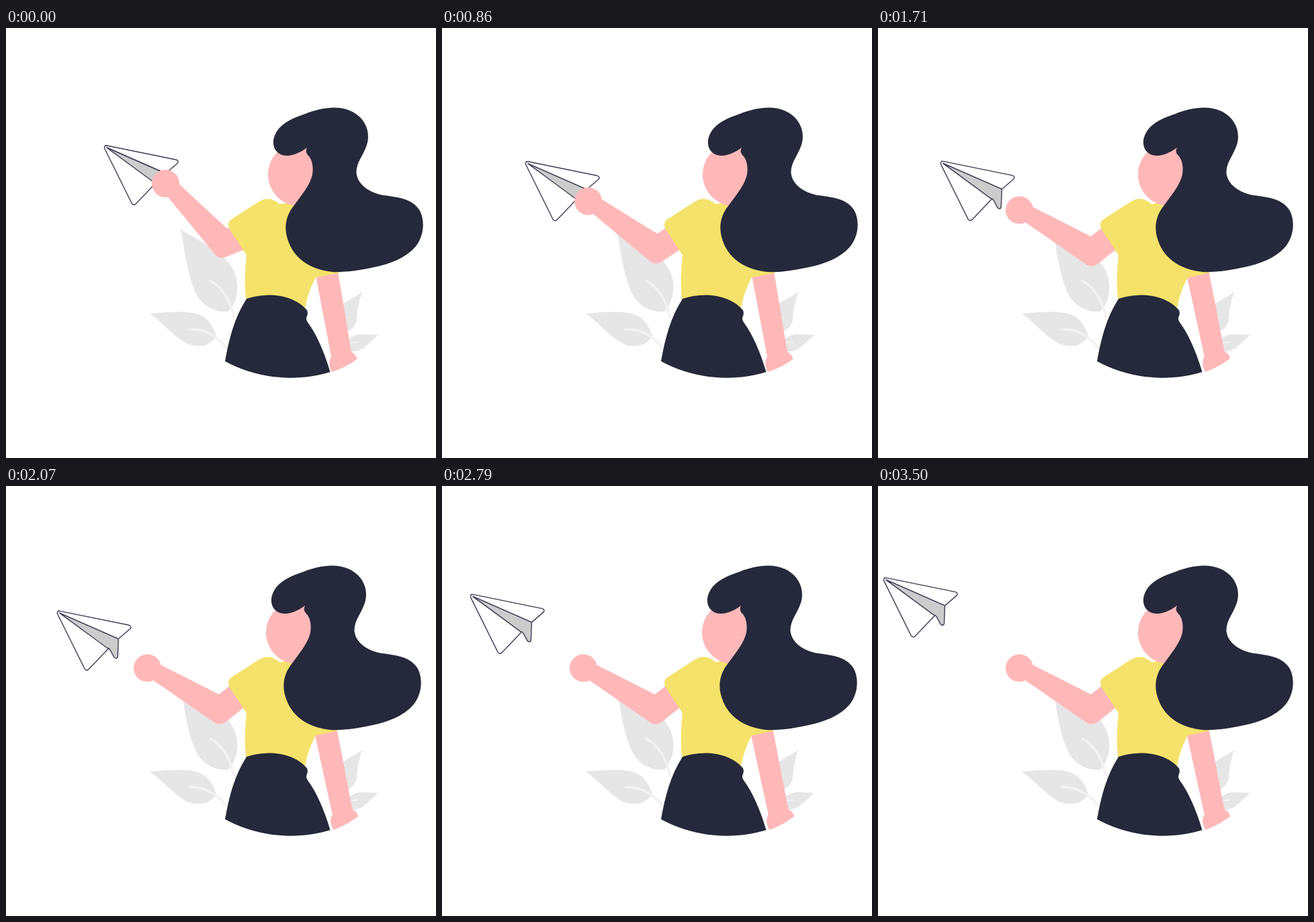
An HTML page that plays this animation: 640 px wide and 640 px high, repeating every 3.57 s.

```html
<!DOCTYPE html>
<html lang="en">
<head>
<meta charset="utf-8">
<title>Paper plane</title>
<style>
  html, body { margin: 0; width: 100%; height: 100%; overflow: hidden; background: #fff; }
  svg { display: block; width: 100%; height: 100%; }
  .leaf { fill: #e6e6e6; }
  .vein { fill: none; stroke: #f2f2f2; stroke-width: 3.5; stroke-linecap: round; }
  .skin { fill: #ffb8b8; }
  .shirt { fill: #f5e26b; }
  .dark { fill: #26293b; }
  #plane { fill: #fff; stroke: #3f3d56; stroke-width: 1.4; stroke-linejoin: round; }
</style>
</head>
<body>
<svg viewBox="0 0 640 640">
  <path class="leaf" d="M260 300C266 330 270 372 285 399C295 416 314 424 331 422C341 411 346 396 344 379C340 340 296 322 260 300Z"/>
  <path class="leaf" d="M214 425C250 422 283 419 298 433Q307 441 313 458C303 475 285 476 270 470C250 460 235 440 214 425Z"/>
  <path class="leaf" d="M530 393C514 405 494 408 490 430L500 453C512 453 521 444 522 434C523 418 526 405 530 393Z"/>
  <path class="leaf" d="M554 457C536 456 520 453 511 463L511 481C530 485 540 468 554 457Z"/>
  <path class="vein" d="M304 376C320 385 333 402 339 430M273 448.5C295 447 314 458 330 478"/>
  <path class="vein" style="stroke-width:2" d="M500 436L508 431M508 470Q516 467 523 468"/>

  <g id="plane">
    <path d="M149.5 177.5L187 261Q190 265 193.500 261.500L223 230.500Z" stroke="none"/>
    <path d="M150 178Q145.500 174 150 175L253 196Q257.500 197.500 255.500 201L237.500 216.500Z"/>
    <path d="M150 175Q145.500 175 146.800 179.500L187.200 261Q190 265 193.500 261.500L223 230.500L150 178"/>
    <path fill="#ccc" d="M150 178L237.500 216.500L236.500 242.500C236 247 232 246 230.500 243L225.500 233.500Q223.500 230 220.500 230Z"/>
  </g>

  <g id="throwArm" class="skin">
    <circle cx="237.5" cy="231.5" r="20.5"/>
    <path d="M252 227L329 298.500L352 289L363 326L327 341Q317 344 311 337L239 249Z"/>
  </g>

  <g id="restArm">
    <path class="skin" d="M461 368L494 362L514 482Q521 486 522.500 493Q504 506 485 512Q478 500 484 489Z"/>
    <path class="shirt" d="M450 340H489L495 365L462 371Z"/>
  </g>

  <path class="shirt" d="M333 300Q328 291 335 285L377 258Q392 249 407 262L428 259L480 320L476 362L461 371Q450 391 445 417L440 428L358 408C354 385 356 358 358 338Z"/>
  <path class="dark" d="M358 403C386 393 427 395 448 420Q450 425 447.500 430Q446 434 449 438C463 457 474 483 482.500 512C434 527 375 523 326 496C332 462 340 431 358 403Z"/>

  <g id="head">
    <circle class="skin" cx="437" cy="218" r="47"/>
    <path class="dark" d="M448 178C440 184 425 193 411 189C399 185 395 172 400 160C407 143 424 135 445 128C470 118 498 114 518 126C535 136 543 155 537 174C532 190 521 200 521.500 216C524 234 541 245 562 249C585 252 605 254 616 272C624 288 622 310 609 326C595 342 572 351 548 356C525 361 505 364 486 363C455 360 432 345 422 322C412 300 416 280 428 265C437 252 452 236 456 218C458 205 455 195 450 190C446 186 446 182 448 178Z"/>
  </g>
</svg>
<script>
const LOOP = 3570, STEP = LOOP / 50;
const RELEASE = 1318, ARM_END = 1365;
const DROP = { x: -34.4, y: 37.1 };      // plane offset at release
const SPEED = { x: -0.0475, y: -0.0346 }; // flight, px per ms

const set = (id, value) => document.getElementById(id).setAttribute('transform', value);
const progress = (t, from, to) => Math.min(1, Math.max(0, (t - from) / (to - from)));
const smooth = u => u * u * (3 - 2 * u);
const softStart = u => u - 0.9 * u * (1 - u) ** 4;

function draw(t) {
  const swing = smooth(progress(t, 0, ARM_END));
  const carry = softStart(progress(t, 0, RELEASE));
  const flight = Math.max(0, t - RELEASE);
  set('plane', `translate(${DROP.x * carry + SPEED.x * flight} ${DROP.y * carry + SPEED.y * flight})`);
  set('throwArm', `rotate(${-16 * swing} 364.5 347.5)`);
  set('head', `translate(${-3 * swing} 0)`);
  set('restArm', `rotate(${-1.5 * progress(t, 1142, 1285)} 478 425)`);
}

let start;
function tick(now) {
  start ??= now;
  const t = (now - start) % LOOP;
  draw(Math.min(49, Math.floor((t + 4) / STEP)) * STEP);
  requestAnimationFrame(tick);
}
draw(0);
requestAnimationFrame(tick);
</script>
</body>
</html>
```
